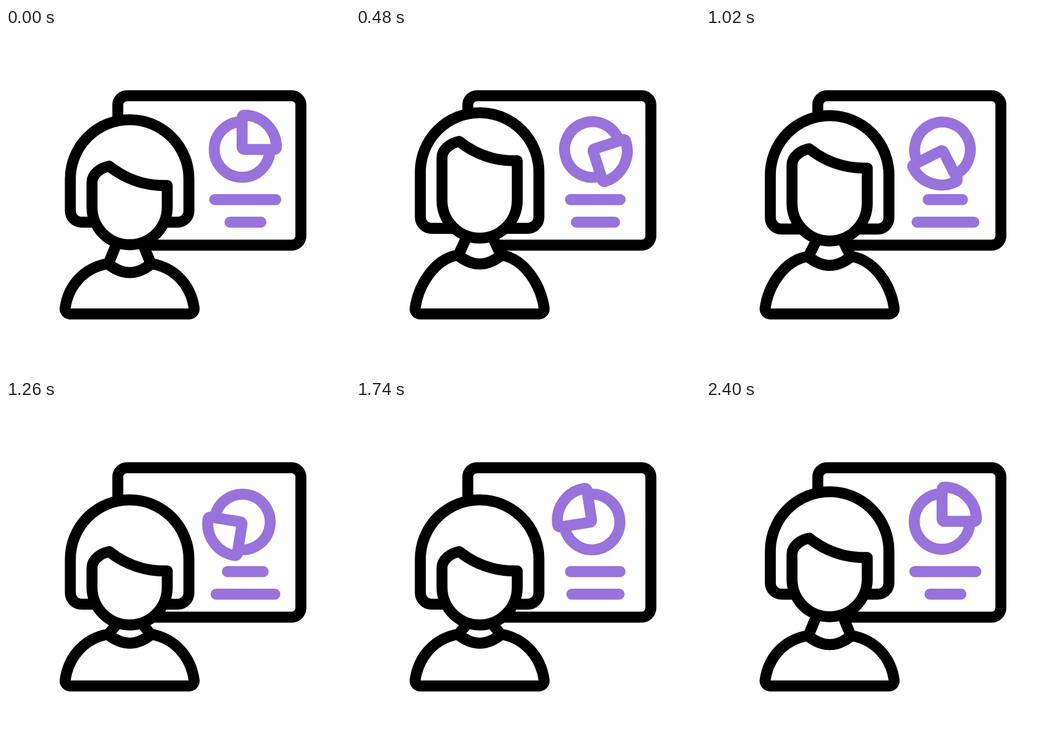
Animation, 640 px wide and 640 px high, one loop 2420 ms. Source, as an HTML page:

```html
<!DOCTYPE html>
<html lang="en">
<head>
<meta charset="utf-8">
<title>Presentation</title>
<style>
  html, body { margin: 0; width: 100%; height: 100%; overflow: hidden; background: #fff; }
  svg { display: block; width: 100vw; height: 100vh; }
  path, rect { stroke-width: 20.4; stroke-linejoin: round; }
  .ink { fill: #fff; stroke: #000; }
  .accent { fill: none; stroke: #9873dc; }
  .bar { stroke-linecap: round; }
</style>
</head>
<body>
<svg viewBox="0 0 640 640">
  <rect class="ink" x="208" y="126" width="340.6" height="278" rx="17.2"/>
  <!-- hides the board's lower left corner beside the neck -->
  <rect x="190" y="300" width="72" height="120" fill="#fff"/>
  <g id="pie" class="accent">
    <path d="M439.2 174.2A51.8 51.8 0 1 0 491 226"/>
    <path d="M443.2 162.2a59.8 59.8 0 0 1 59.8 59.8a4 4 0 0 1 -4 3.8H443.2a4 4 0 0 1 -4 -4V166.2a4 4 0 0 1 4 -4Z"/>
  </g>
  <path id="bar1" class="accent bar"/>
  <path id="bar2" class="accent bar"/>
  <g class="ink" transform="translate(230 0)">
    <path id="body"/>
    <path id="neck"/>
    <path id="hair"/>
    <path id="face"/>
  </g>
</svg>
<script>
  const LOOP = 2420, SPIN = 2400, BEAT = 480;

  const rest = { top: 170.6, hem: 361.3, brow: 257, chin: 403.2, collar: 438.5 };
  const up = { top: 157.6, hem: 372.7, brow: 211, chin: 390.9, collar: 422.5 };
  const down = { top: 191.1, hem: 381.2, brow: 295.6, chin: 423.8, collar: 438.5 };

  const $ = id => document.getElementById(id);
  const setPath = (id, d) => $(id).setAttribute('d', d);
  const clamp = x => Math.min(1, Math.max(0, x));
  const ease = x => x * x * (3 - 2 * x);
  const mix = (a, b, k) => a + (b - a) * k;
  const mixPose = (a, b, k) =>
    Object.fromEntries(Object.keys(a).map(key => [key, mix(a[key], b[key], k)]));

  // Rises from 0 at start to 1 at peak, then falls back to 0 at end
  const pulse = (t, start, peak, end) =>
    ease(clamp(t < peak ? (t - start) / (peak - start) : (end - t) / (end - peak)));

  // Stretch up for one beat, bob once per beat, settle back in the last beat
  function poseAt(t) {
    const settle = 4 * BEAT;
    if (t < BEAT || t > settle) return mixPose(rest, up, pulse(t, 0, BEAT, BEAT + 1) || pulse(t, settle - 1, settle, SPIN));
    return mixPose(up, down, pulse(t % BEAT, 0, BEAT / 2, BEAT));
  }

  function drawFigure({ top, hem, brow, chin, collar }) {
    setPath('hair', `M-110.3 ${top + 110.3}a110.3 110.3 0 0 1 220.6 0V${hem - 21}
      a21 21 0 0 1 -21 21H-89.3a21 21 0 0 1 -21 -21Z`);
    setPath('face', `M-70 ${brow + 30}c0 -15 16 -27 32 -30c30 24 66 36 102 36h6
      V${chin - 70}a70 70 0 0 1 -140 0Z`);
    setPath('neck', `M-25 ${chin}L-39.5 ${collar}q39.5 33 79 0L25 ${chin}`);
    setPath('body', `M-120 521.5C-114 478 -84 ${collar + 7.5} -41 ${collar}q41 33 82 0
      C84 ${collar + 7.5} 114 478 120 521.5a9.5 9.5 0 0 1 -9 10.5H-111a9.5 9.5 0 0 1 -9 -10.5Z`);
  }

  const drawBar = (id, x, y, half) => setPath(id, `M${x - half} ${y}h${2 * half}`);

  function draw(now) {
    const t = now % LOOP;
    $('pie').setAttribute('transform', `rotate(${360 * Math.min(1, t / SPIN)} 439.5 226.5)`);
    drawBar('bar1', 445.2, 319.2, mix(56.8, 31.7, pulse(t, 0, 1080, 2280)));
    drawBar('bar2', 445.5, 361.3, mix(28.8, 54.8, pulse(t, 120, 1200, LOOP)));
    drawFigure(poseAt(t));
    requestAnimationFrame(draw);
  }
  draw(0);
</script>
</body>
</html>
```
